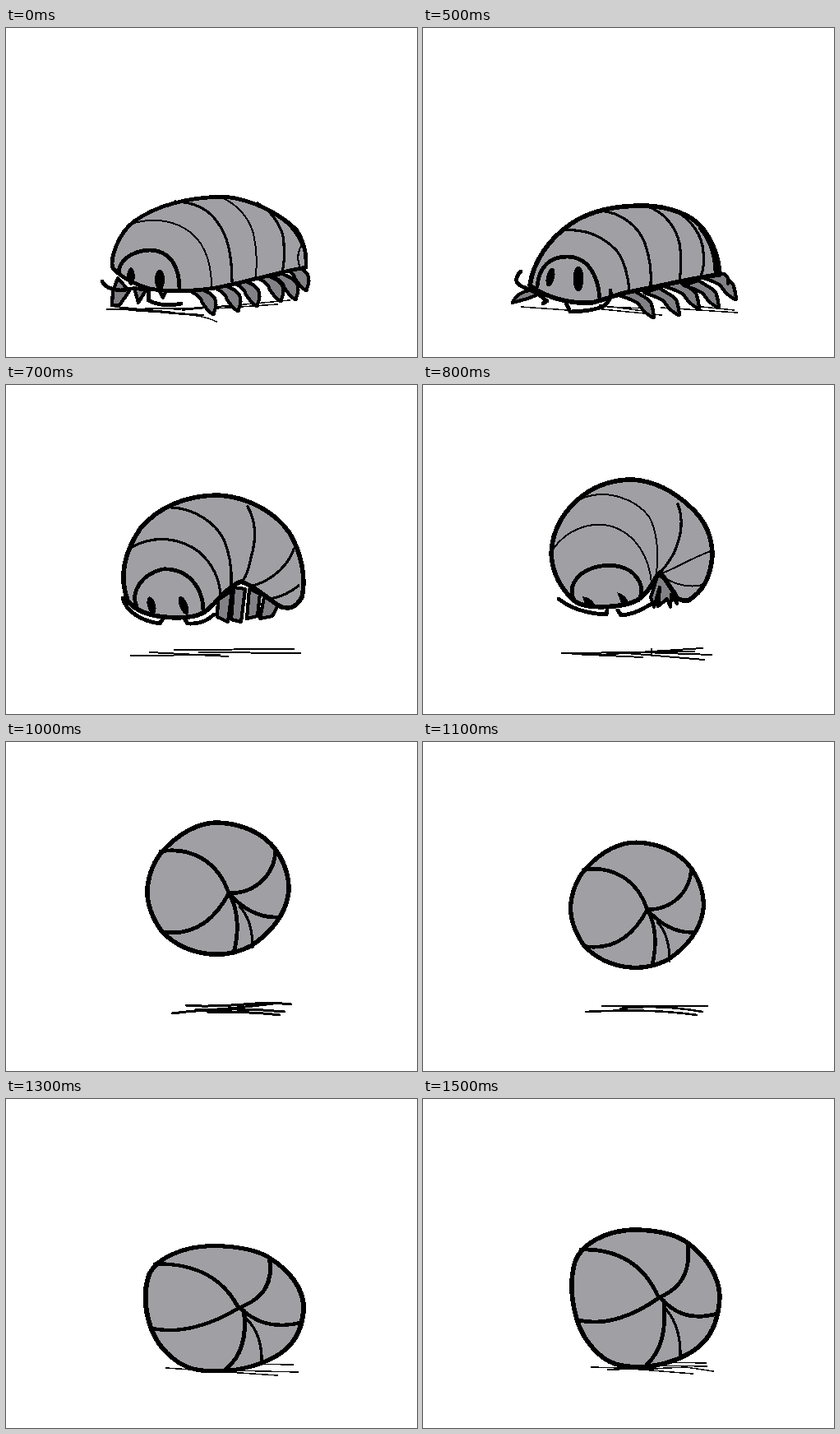
Animation, 500 px wide and 400 px high, one loop 2 s. Source, as an HTML page:

```html
<!DOCTYPE html>
<html lang="en">
<head>
<meta charset="utf-8">
<title>Curling woodlouse</title>
<style>
html, body { margin: 0; width: 100%; height: 100%; overflow: hidden; background: #fff; }
svg { display: block; width: 100%; height: 100%; shape-rendering: crispEdges; }
path, ellipse { stroke: #000; stroke-linecap: round; stroke-linejoin: round; fill: none; }
.body { fill: #a09fa4; stroke-width: 5.6; }
.leg { fill: #828186; stroke-width: 4.2; }
.bold { stroke-width: 4.8; }
.seam { stroke-width: 3.2; }
.thin { stroke-width: 2; }
.ground { stroke-width: 2.6; }
.hair { stroke-width: 1.5; }
.eye { fill: #000; stroke: none; }
.pose { visibility: hidden; animation: brief 2s step-end infinite; animation-delay: calc(var(--t) * 1ms - 2000ms); }
.hold { animation-name: hold; }
@keyframes brief { 0% { visibility: visible; } 5%, 100% { visibility: hidden; } }
@keyframes hold { 0% { visibility: visible; } 25%, 100% { visibility: hidden; } }
</style>
</head>
<body>
<svg viewBox="0 0 500 400">
  <defs>
    <path id="claw" class="leg" d="M-30-29C-22-26-18-22-15-19C-14-14-10-8-2-1C0 1 1 0 1-2C4-9 4-15 2-19C-1-25-8-28-16-31Z"/>
    <path id="spike" class="leg" d="M-42-27C-32-24-24-21-18-17C-14-10-8-4-2-1C0 1 1 0 1-2C0-8-1-14-3-19C-8-24-16-28-24-33Z"/>
  </defs>

  <!-- standing -->
  <g class="pose hold" style="--t:0">
    <path class="thin" d="M123 342L215 341M133 339L205 346M150 343L240 349M205 342L270 338"/>
    <path class="hair" d="M190 346C215 349 235 347 256 357M215 343L345 331M255 341L330 336"/>
    <path class="leg" d="M136 304L130 320L129 337L138 337L150 320ZM156 316L161 334L170 319ZM186 318L191 328L195 319Z"/>
    <use href="#claw" x="252" y="348"/>
    <use href="#claw" x="282" y="344"/>
    <use href="#claw" x="305" y="338"/>
    <use href="#claw" x="334" y="332"/>
    <use href="#claw" x="352" y="330"/>
    <use href="#claw" x="365" y="319"/>
    <path class="body" style="stroke-width:4.8" d="M130 292C126 280 137 249 156 235C180 218 213 206 265 205C300 208 335 227 353 245C362 258 366 272 365 291C335 296 300 307 255 316C225 321 190 320 175 317C158 312 140 303 130 292Z"/>
    <path class="thin" d="M150 239C178 229 203 235 218 244C241 258 250 285 250 315M262 206C283 215 296 232 301 250C305 268 306 290 303 305M361 262C355 270 354 280 357 290"/>
    <path class="seam" d="M205 211C230 211 248 222 257 236C270 252 275 280 275 309M306 213C328 225 338 248 338 262C339 280 338 292 335 298M325 226C342 235 353 246 361 266"/>
    <path class="bold" d="M137 298C137 285 150 271 175 270C200 271 211 290 211 317"/>
    <ellipse class="eye" cx="152" cy="302" rx="4.8" ry="11"/>
    <ellipse class="eye" cx="187" cy="306" rx="6" ry="12"/>
    <path class="bold" d="M117 308C120 315 127 318 140 319L153 317M174 320L173 331C185 337 200 338 213 335"/>
  </g>

  <!-- crouching -->
  <g class="pose" style="--t:500">
    <path class="hair" d="M120 339L175 343M215 337L275 345M218 342L290 349M225 339L270 341M290 340L382 346M330 338L378 343"/>
    <path class="leg" d="M109 334C112 326 120 320 131 319L140 324L127 329Z"/>
    <use href="#spike" x="280" y="352"/>
    <use href="#spike" x="311" y="349"/>
    <use href="#spike" x="335" y="341"/>
    <use href="#spike" x="359" y="340"/>
    <use href="#spike" x="380" y="330"/>
    <path class="leg" d="M357 300C367 295 373 303 371 311"/>
    <path class="body" d="M130 313C134 285 152 257 180 238C205 221 235 216 270 216C300 217 325 227 337 240C352 256 360 280 361 300C330 303 290 314 250 321C235 324 220 331 205 334C175 336 145 325 130 313Z"/>
    <path class="seam" d="M167 246C195 244 215 250 235 270C245 282 250 303 251 320M215 222C240 224 262 240 270 262C277 282 278 300 277 314M271 216C295 224 308 243 312 262C315 280 314 295 312 307M303 220C320 228 336 245 340 265C343 282 341 295 338 302"/>
    <path class="bold" d="M337 243C350 258 355 275 356 296M139 314C141 290 155 278 175 278C200 278 213 300 215 329"/>
    <ellipse class="eye" cx="155" cy="303" rx="5" ry="11.5" transform="rotate(14 155 303)"/>
    <ellipse class="eye" cx="189" cy="305" rx="6.5" ry="15"/>
    <path class="bold" d="M119 296C110 305 113 311 122 315L137 321L151 332L146 335M174 334L179 345C195 345 212 342 220 338C227 332 229 328 228 319"/>
  </g>

  <!-- leaping -->
  <g class="pose" style="--t:600">
    <path class="ground" style="stroke-width:2" d="M135 331C155 333 175 332 215 331M163 328L275 321M188 321L250 322L330 319M200 325L300 324M250 316C290 319 330 317 368 323M300 320L355 320"/>
    <path class="leg" d="M176 297L185 313L204 319L198 297ZM214 299L228 310L247 313L237 293L229 278ZM251 262C257 276 255 286 247 295L268 311C273 297 271 275 266 254ZM277 253C284 270 278 285 278 305C290 295 297 280 294 256ZM303 260C313 272 309 285 297 299L313 305C322 290 323 277 318 264ZM330 270C338 280 330 292 320 309C335 303 350 291 348 274ZM350 274L362 278L360 292L344 294Z"/>
    <path class="body" d="M140 287C128 270 126 245 133 225C142 203 160 184 190 167C215 155 240 154 262 154C300 157 325 167 343 191C360 215 370 245 369 278C345 273 325 262 305 255C287 248 265 252 247 262C230 274 222 288 205 293C185 298 160 296 140 287Z"/>
    <path class="seam" d="M148 200C180 195 205 200 222 218C235 235 240 250 243 264M208 165C230 172 248 192 253 212C258 230 260 245 261 255M273 156C285 165 291 185 290 205C290 225 287 240 285 250M345 203C352 208 350 220 346 230C338 243 328 250 314 257M366 242C358 255 350 262 340 267M224 251C229 253 231 260 231 269"/>
    <path class="bold" d="M140 275C135 250 150 232 170 231C195 232 212 255 217 282"/>
    <ellipse class="eye" cx="156" cy="275" rx="5.5" ry="14"/>
    <ellipse class="eye" cx="191" cy="274" rx="6" ry="16" transform="rotate(-14 191 274)"/>
    <path class="bold" d="M120 254C118 270 129 287 151 299L158 292M202 293C209 296 216 302 225 303L231 298"/>
  </g>

  <!-- curling -->
  <g class="pose" style="--t:700">
    <path class="ground" style="stroke-width:2" d="M152 329L260 328M175 325L270 330M205 322L350 321M235 325L358 326"/>
    <path class="leg" d="M258 261L257 282L270 288L275 250ZM277 246L274 285L286 288L291 248ZM296 248L293 284L306 281L309 254ZM314 258L309 284L324 281L332 266Z"/>
    <path class="body" d="M148 262C138 235 143 205 163 175C185 148 220 134 258 134C295 136 328 155 345 180C360 205 365 235 360 258C352 272 345 272 335 270C320 262 305 245 286 239C268 245 255 268 240 277C225 285 195 284 175 279C162 275 153 270 148 262Z"/>
    <path class="seam" d="M152 198C180 181 213 186 235 203C253 219 260 238 261 256M201 149C230 150 255 168 265 188C273 207 275 225 274 243M294 148C305 167 304 190 298 210C295 225 291 235 287 239M350 200C343 219 326 236 301 244M356 244C345 253 333 258 321 260"/>
    <path class="bold" d="M159 270C151 250 166 230 190 224C220 222 240 245 240 275"/>
    <ellipse class="eye" cx="177" cy="268" rx="5" ry="11" transform="rotate(-15 177 268)"/>
    <ellipse class="eye" cx="216" cy="268" rx="5" ry="12" transform="rotate(-22 216 268)"/>
    <path class="bold" d="M142 259C146 275 164 287 187 290L191 284M217 284L221 290C235 291 246 286 253 279"/>
  </g>

  <g class="pose" style="--t:800">
    <path class="ground" style="stroke-width:2" d="M169 326L268 325L351 328M182 327L267 331M215 328L340 320M235 325L342 334M180 326L330 324M278 321L278 328"/>
    <path class="leg" d="M286 230L277 258L281 270L288 246L286 269L297 260L301 270L302 255L309 266L309 248Z"/>
    <path class="body" d="M185 263C168 249 157 228 156 205C157 175 173 150 195 134C215 119 235 115 255 115C285 117 308 132 325 148C343 164 352 185 352 207C350 235 340 251 323 262C313 263 308 260 306 253C299 245 293 231 288 228C280 236 276 253 260 262C245 270 200 274 185 263Z"/>
    <path class="thin" d="M158 200C175 175 205 165 230 172C260 182 275 210 278 240M193 138C225 125 260 140 275 160C285 178 287 205 284 228M350 202C325 211 310 222 288 230M340 243C320 248 300 240 288 230"/>
    <path class="seam" d="M310 145C318 165 314 185 305 205C298 217 292 225 286 230"/>
    <path class="bold" d="M184 262C178 250 181 240 192 230C210 217 235 216 252 226C265 236 270 250 262 262"/>
    <path class="eye" d="M194 257C202 257 209 264 211 271L198 270ZM236 252C244 253 250 261 251 268L243 270Z"/>
    <path class="bold" d="M165 260C180 272 202 278 223 279L224 274M237 274L241 280C256 279 268 272 280 265"/>
  </g>

  <g class="pose" style="--t:900">
    <path class="ground" d="M185 328L340 326M210 323L347 322M220 329L337 332"/>
    <path class="body" d="M256 105C288 107 313 122 328 139C344 156 350 178 348 200C344 226 331 244 311 255C290 264 264 268 240 266C214 264 192 253 178 237C166 220 162 201 164 184C167 161 179 141 196 127C215 112 233 105 256 105Z"/>
    <path class="seam" d="M168 169C204 151 254 161 279 208M201 126C238 127 270 155 279 208M320 138C323 166 309 192 279 208M346 205C320 211 300 212 279 208M332 238C310 234 295 226 279 208M279 208C284 225 289 245 287 261M279 208C273 226 267 239 258 247"/>
    <path class="bold" d="M194 250C195 236 215 227 236 232C252 236 259 249 256 263"/>
  </g>

  <!-- ball -->
  <defs>
    <g id="high">
      <path class="body" d="M257 98C290 99 315 113 328 131C342 150 346 172 343 188C338 212 322 232 298 248C280 257 262 259 250 258C225 256 205 246 190 231C177 213 171 195 172 178C174 158 182 142 192 131C210 112 233 98 257 98Z"/>
      <path class="bold" d="M188 133C225 127 258 145 271 184M190 231C225 236 252 220 271 184M328 131C327 160 305 184 271 184C290 205 310 214 331 213M271 184C284 205 283 235 277 256"/>
      <path class="seam" d="M284 200C296 212 300 230 300 250"/>
    </g>
    <g id="low">
      <path class="body" d="M260 159C290 160 310 166 322 175C345 192 360 215 361 240C360 265 352 285 340 297C325 312 300 322 275 325C250 327 230 325 215 311C200 298 190 282 185 260C179 235 180 215 185 198C192 178 220 159 260 159Z"/>
      <path class="bold" d="M192 183C235 182 268 200 286 240M190 269C220 276 255 265 288 241M322 175C326 205 318 228 288 241C305 260 325 270 358 261M293 245C296 275 292 305 272 323"/>
      <path class="seam" d="M296 256C308 270 314 290 313 316"/>
    </g>
  </defs>

  <g class="pose" style="--t:1000">
    <path class="ground" style="stroke-width:3" d="M202 330C240 325 290 323 339 328M219 320C255 324 300 317 325 317L347 319M230 326C265 326 300 321 325 318M245 328C280 328 310 329 333 332"/>
    <use href="#high"/>
  </g>

  <g class="pose" style="--t:1100">
    <path class="ground" d="M198 328C240 326 285 325 333 332M218 321L346 321M240 324C275 320 312 323 340 328"/>
    <use href="#high" transform="translate(18 29) scale(.94 .95)"/>
  </g>

  <g class="pose" style="--t:1200">
    <path class="ground" d="M193 326C235 325 275 328 320 336M216 321C250 323 290 316 346 324M240 322C275 319 305 328 339 329M255 325L313 328"/>
    <path class="body" d="M232 152C262 146 285 156 305 168C325 180 337 200 337 220C338 245 332 270 318 283C303 296 285 299 265 299C240 297 222 290 208 280C190 262 183 243 184 225C185 200 200 172 232 152Z"/>
    <path class="bold" d="M205 281C245 285 270 262 274 230M303 168C310 190 306 210 278 227C295 237 315 240 335 239M285 234C297 250 301 270 302 291M290 236C305 245 316 258 323 273"/>
    <path class="seam" d="M196 191C225 192 245 200 278 227"/>
  </g>

  <g class="pose" style="--t:1300">
    <path class="hair" d="M195 327L330 336M285 322L349 323M270 330L355 332"/>
    <use href="#low" transform="translate(-24 33) scale(1.07 .915)"/>
  </g>

  <g class="pose" style="--t:1400">
    <path class="hair" d="M205 326L328 334M290 322L346 322M280 327L353 331"/>
    <use href="#low" transform="translate(8 -8) scale(.97 1.025)"/>
  </g>

  <g class="pose hold" style="--t:1500">
    <path class="hair" d="M205 326L240 327L328 334M225 329L285 328M290 320L344 321M280 324L345 325M275 328L320 326L353 331"/>
    <use href="#low"/>
  </g>
</svg>
</body>
</html>
```
